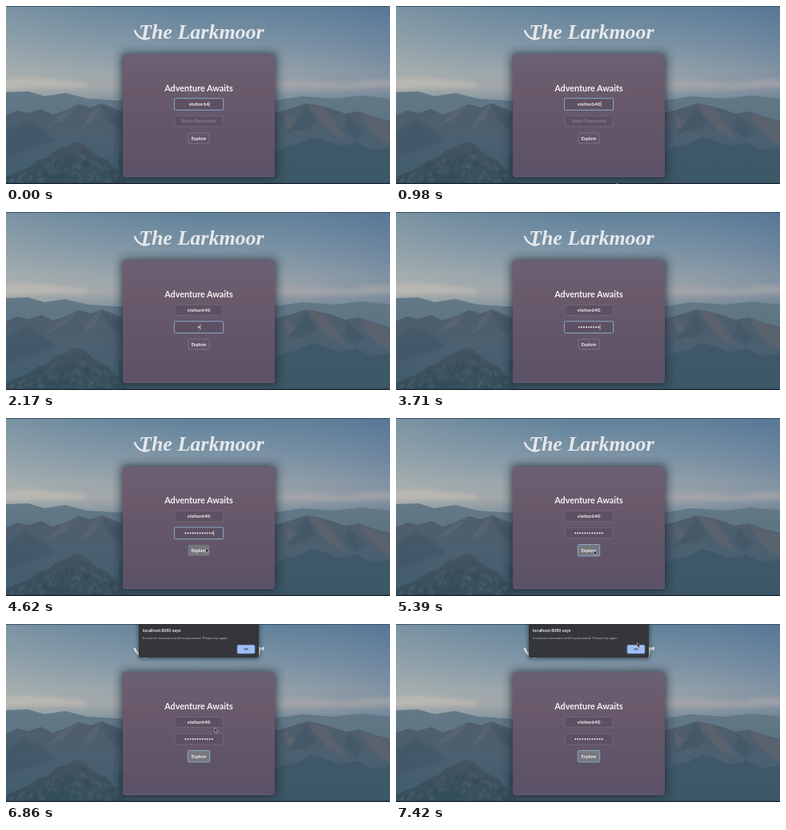
Write an HTML page that moves like this. It is 480 by 223 pixels and loops after 7.49 s.

```html
<!DOCTYPE html>
<html lang="en">
<head>
<meta charset="utf-8">
<title>Sign in</title>
<style>
html, body { margin: 0; width: 100%; height: 100%; overflow: hidden; background: #465e6d; }
svg { display: block; width: 100%; height: 100%; }
text { font-family: Lato, sans-serif; font-weight: 700; fill: #f4f1f3; text-anchor: middle; }
.brand { font: italic 700 26px "Liberation Serif", serif; text-anchor: start; fill: #e6e8eb; }
.swash { fill: none; stroke: #e6e8eb; stroke-width: 2.4; stroke-linecap: round; }
.field { fill: #5d5062; stroke: #7c6f81; stroke-width: .7; }
.button { fill: #62556a; stroke: #877b8d; stroke-width: .7; }
.button.hover { fill: #77777e; stroke: #77777e; }
.field.focus, .button.focus { stroke: #86aacb; stroke-width: 1; }
.entry { font-size: 6.4px; }
.hint { font-size: 6.2px; fill: #8b7e90; }
.alert text { font-family: Roboto, sans-serif; text-anchor: start; }
</style>
</head>
<body>
<svg viewBox="0 0 480 223" preserveAspectRatio="none">
  <defs>
    <linearGradient id="sky" x2="0" y2="1">
      <stop offset="0" stop-color="#5a7d98"/>
      <stop offset=".2" stop-color="#7891a4"/>
      <stop offset=".36" stop-color="#95a3aa"/>
      <stop offset=".45" stop-color="#a0a5a8"/>
      <stop offset=".52" stop-color="#7f919c"/>
      <stop offset="1" stop-color="#496575"/>
    </linearGradient>
    <linearGradient id="light">
      <stop offset="0" stop-color="#c6c6b8" stop-opacity=".3"/>
      <stop offset=".5" stop-color="#a0aab0" stop-opacity=".08"/>
      <stop offset="1" stop-color="#4d6890" stop-opacity=".3"/>
    </linearGradient>
    <linearGradient id="far" x2="0" y2="1">
      <stop offset="0" stop-color="#647988"/><stop offset="1" stop-color="#4d6878"/>
    </linearGradient>
    <linearGradient id="middle" x2="0" y2="1">
      <stop offset="0" stop-color="#4f5d6b"/><stop offset=".45" stop-color="#4b6070"/>
      <stop offset="1" stop-color="#3f5c6b"/>
    </linearGradient>
    <linearGradient id="near" x2="0" y2="1">
      <stop offset="0" stop-color="#46545f"/><stop offset="1" stop-color="#344f5d"/>
    </linearGradient>
    <linearGradient id="card" x2="0" y2="1">
      <stop offset="0" stop-color="#6b6073"/><stop offset=".3" stop-color="#69596b"/>
      <stop offset="1" stop-color="#5b5166"/>
    </linearGradient>
    <filter id="soft" x="-20%" y="-100%" width="140%" height="300%"><feGaussianBlur stdDeviation="2.5"/></filter>
    <filter id="slight"><feGaussianBlur stdDeviation="1.2"/></filter>
    <filter id="shadow" x="-20%" y="-20%" width="140%" height="140%"><feGaussianBlur stdDeviation="6"/></filter>
  </defs>

  <rect width="480" height="223" fill="url(#sky)"/>
  <rect width="480" height="118" fill="url(#light)"/>
  <g filter="url(#soft)">
    <path d="M-10 93 Q20 87 50 91 T100 96 V102 Q50 101 -10 104Z" fill="#bdbab3" opacity=".8"/>
    <path d="M325 97 Q360 90 396 95 T440 95 T490 93 V101 Q410 105 325 103Z" fill="#a5a6aa" opacity=".7"/>
  </g>
  <path d="M0 108 L28 107 48 113 74 109 102 116 150 119 H330 L370 113 410 116 445 112 480 116 V223 H0Z" fill="url(#far)"/>
  <path d="M0 137 L14 131 28 134 44 129 58 136 74 131 91 123 106 127 120 122 133 127 150 134 H330 L343 132 357 128 376 122 392 125 408 129 424 135 441 132 460 139 480 144 V223 H0Z" fill="url(#middle)"/>
  <g filter="url(#slight)" opacity=".5">
    <path d="M376 122 L390 141 402 156 426 169 413 148 399 128Z M441 133 L453 153 470 169 480 172 V146Z M345 133 L352 152 369 164 361 144Z" fill="#68656e"/>
    <path d="M120 122 L112 141 93 156 104 136Z M91 124 L72 143 49 153 70 134Z" fill="#646a74"/>
    <path d="M375 124 L364 143 349 160 378 155 388 146Z M427 137 L422 155 438 168 447 157Z M120 124 L129 146 144 155 V137Z M0 157 L24 143 46 154 62 169 0 190Z" fill="#3d5364"/>
  </g>
  <path d="M140 186 L326 188 347 177 365 173 382 164 397 168 418 176 438 171 458 181 480 177 V223 H140Z" fill="#3b5665" opacity=".75"/>
  <path d="M0 214 L14 208 27 203 41 193 52 190 63 180 76 176 86 170 98 173 106 181 115 188 127 193 136 204 150 211 V223 H0Z" fill="url(#near)"/>
  <g id="rocks" fill="none" stroke-width="1.5" filter="url(#slight)"></g>
  <path d="M0 .5H480" stroke="#3c566b"/>
  <path d="M0 222.5H480" stroke="#1c242d" stroke-width="1.4"/>

  <path class="swash" d="M161 31 C164 39 172 44 179 40"/>
  <text class="brand" x="166" y="41">The Larkmoor</text>

  <rect x="144" y="59" width="194" height="157" rx="3" fill="#1a232e" opacity=".75" filter="url(#shadow)"/>
  <rect x="146" y="61" width="190" height="153" rx="2" fill="url(#card)"/>
  <path d="M148 213.7H334" stroke="#7c6f7b" stroke-width=".6"/>
  <text x="241" y="107" font-size="10.8">Adventure Awaits</text>

  <rect id="userBox" class="field"/>
  <text id="user" class="entry" x="241" y="125.2"></text>
  <rect id="passBox" class="field"/>
  <text id="hint" class="hint" x="241" y="146.4">Enter Password</text>
  <g id="dots" fill="#f4f1f3"></g>
  <path id="caret" stroke="#f4f1f3" stroke-width=".7"/>
  <rect id="button" class="button"/>
  <text x="241" y="167.7" font-size="5.5">Explore</text>

  <g id="alert" class="alert">
    <rect x="165" y="-6" width="152" height="50" rx="3" fill="#10151b" opacity=".5" filter="url(#soft)"/>
    <path d="M166 0H316V40Q316 42 314 42H168Q166 42 166 40Z" fill="#35363a"/>
    <text x="171" y="9.8" style="font-size:5.3px;font-weight:500;fill:#e8eaed">localhost:8080 says</text>
    <text x="171" y="19.2" style="font-size:4.4px;font-weight:400;fill:#b6b9be">Incorrect username and/or password. Please try again.</text>
    <rect x="289" y="26.3" width="22" height="10.7" rx="1.5" fill="#a0bff5" stroke="#6c91cf" stroke-width=".7"/>
    <text x="300" y="33.2" style="font-size:4.2px;font-weight:500;fill:#29364c;text-anchor:middle">OK</text>
  </g>

  <path id="arrow" d="M0 0V5.6L1.4 4.4 2.3 6.4 3.4 5.9 2.5 4H4.2Z" fill="#18171c" stroke="#d0ccd2" stroke-width=".6"/>
  <path id="beam" d="M-1.3 -4H1.3M0 -4V4M-1.3 4H1.3" stroke="#17151b" stroke-width=".8"/>
</svg>
<script>
const LOOP = 7490, STEP = 70;
const USERNAME = "visitor640";
const keyTimes = [2170, 2310, 2450, 2590, 2800, 3010, 3150, 3290, 3430, 3780, 3990, 4200];
const pointerPath = [
  [980, 276, 222], [1330, 255, 157], [1400, 254.5, 155.5], [1540, 254.5, 155.5], [1750, 257, 145],
  [4340, 257, 145], [4620, 249.5, 163], [4970, 247.5, 166], [6650, 247.5, 166],
  [7280, 299, 27], [7420, 301.5, 23.5]
];
const el = id => document.getElementById(id);
const show = (node, on) => node.setAttribute("visibility", on ? "visible" : "hidden");

function addShape(parent, tag, attributes) {
  const node = document.createElementNS("http://www.w3.org/2000/svg", tag);
  for (const name in attributes) node.setAttribute(name, attributes[name]);
  parent.append(node);
  return node;
}

function setBox(node, cy, halfWidth, halfHeight) {
  const box = { x: 241 - halfWidth, y: cy - halfHeight, width: 2 * halfWidth, height: 2 * halfHeight, rx: 1.2 };
  for (const name in box) node.setAttribute(name, box[name]);
}

function setField(node, cy, focused) {
  node.classList.toggle("focus", focused);
  setBox(node, cy, focused ? 30.6 : 30, focused ? 7.3 : 6.6);
}

// Light and dark streaks that follow the slopes of the nearest peak.
let seed = 11;
const random = () => (seed = seed * 16807 % 2147483647) / 2147483647;
for (let i = 0; i < 90; i++) {
  const x = 8 + random() * 136;
  const ridge = 172 + Math.abs(x - 88) * (x < 88 ? .49 : .64);
  const y = ridge + 4 + random() * Math.max(0, 216 - ridge);
  const slope = x < 88 ? -1 : 1;
  addShape(el("rocks"), "path", {
    d: `M${x} ${y}l${slope * (2 + random() * 4)} ${2 + random() * 5}`,
    stroke: random() < .5 ? "#637079" : "#293f4c", opacity: .6
  });
}

const dots = keyTimes.map(() => addShape(el("dots"), "circle", { cy: 144.2, r: .95 }));

function pointerAt(t) {
  const next = pointerPath.findIndex(point => point[0] > t);
  if (next < 0) return pointerPath.at(-1).slice(1);
  if (next === 0) return pointerPath[0].slice(1);
  const [t0, x0, y0] = pointerPath[next - 1], [t1, x1, y1] = pointerPath[next];
  const u = (t - t0) / (t1 - t0), ease = u * u * (3 - 2 * u);
  return [x0 + (x1 - x0) * ease, y0 + (y1 - y0) * ease];
}

function draw(t) {
  const inUser = t < 1750, inPass = t >= 1750 && t < 5390, pressed = t >= 5390;

  setField(el("userBox"), 123, inUser);
  setField(el("passBox"), 144.3, inPass);
  el("user").textContent = USERNAME.slice(0, t < 140 ? 9 : 10);

  const typed = keyTimes.filter(time => time <= t).length;
  show(el("hint"), typed === 0);
  dots.forEach((dot, i) => {
    show(dot, i < typed);
    dot.setAttribute("cx", 241 + (i - (typed - 1) / 2) * 3.05);
  });

  const caretX = inUser ? 241.6 + el("user").getComputedTextLength() / 2 : 241.3 + typed * 1.525;
  el("caret").setAttribute("d", `M${caretX} ${inUser ? 119.7 : 141}v6.6`);
  show(el("caret"), inUser || inPass && typed > 0);

  const button = el("button");
  button.classList.toggle("hover", t >= 4480);
  button.classList.toggle("focus", pressed);
  setBox(button, 165.7, pressed ? 13.7 : 13, pressed ? 7.2 : 6.5);

  show(el("alert"), t >= 5810);

  const [x, y] = pointerAt(t);
  const visible = t >= 980 && t < 1890 || t >= 4340;
  const overField = y > 137 && y < 151 && t < 4480;
  for (const id of ["arrow", "beam"]) {
    el(id).setAttribute("transform", `translate(${x} ${y})`);
    show(el(id), visible && overField === (id === "beam"));
  }
}

const start = performance.now();
function tick() {
  const t = (performance.now() - start) % LOOP;
  draw(Math.floor(t / STEP) * STEP);
  requestAnimationFrame(tick);
}
tick();
</script>
</body>
</html>
```
